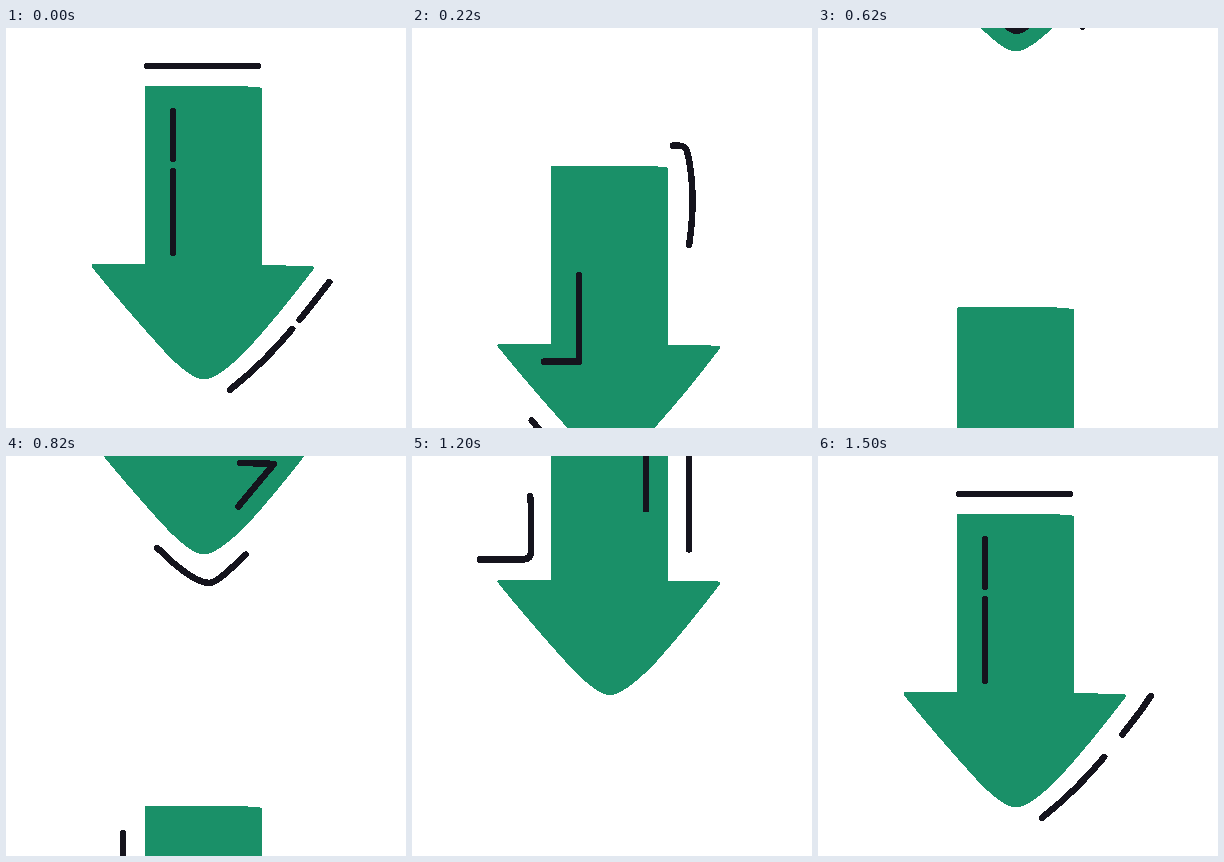
An HTML page that plays this animation: 400x400 px, repeating every 1.52 s.

```html
<!DOCTYPE html>
<html lang="en">
<head>
<meta charset="utf-8">
<title>Falling arrow</title>
<style>
  html, body { margin: 0; width: 100%; height: 100%; overflow: hidden; background: #fff; }
  svg { display: block; width: 100%; height: 100%; shape-rendering: crispEdges; }
  .body { fill: #1a9068; stroke: #1a9068; stroke-width: 4; stroke-linejoin: round; }
  .dash { fill: none; stroke: #15141d; stroke-width: 6.5; stroke-linecap: round; stroke-linejoin: round; }
</style>
</head>
<body>
<svg viewBox="0 0 400 400">
  <g id="arrow">
    <path class="body" d="M140.500 60H236L254 61.500V239L306 240Q271 286 241 319Q211 349.500 198 349.500Q185 349.500 157 319Q119 277 87.500 238L141.500 238Z"/>
  </g>
  <use id="next" href="#arrow"/>
</svg>
<script>
const LOOP = 1520;
const STEPS = 60;
const arrow = document.getElementById('arrow');
const next = document.getElementById('next');

// Tracks the dashes run along, in arrow coordinates
const ROUNDED = 'M141 38H262Q273 37 275 43Q285 85 277 138V205Q277 214 285 214H328' +
  'Q343 215 337 230Q300 292 246 346C225 365 212 380 203 380C190 380 168 362 157 350' +
  'Q135 332 110 301Q60 243 53 224Q50 217 62 216H110Q119 216 119 208V162Q114 112 119 60Q119 38 141 38Z';
const SHARP = 'M117 38H277V214H350L324 253Q306 277 287 300Q260 333 225 361' +
  'Q210 380 203 380Q190 380 157 350Q140 337 124 318L41 214H117Z';
const INNER = 'M167 83V254H130L166 304Q190 331 199 331Q208 331 232 304L268 261L234 260V83L210 81H167Z';

// head: start position of the tip; power and lag shape the easing of one lap
const dashes = [
  makeDash(ROUNDED, { head: 111, length: 111, power: 1.15 }),
  makeDash(SHARP, { head: 604, length: 87, lag: 0.135 }),
  makeDash(SHARP, { head: 505, length: 48, power: 0.9, lag: 0.1, steps: STEPS + 1 }),
  makeDash(INNER, { head: 48, length: 48, power: 1.11 }),
  makeDash(INNER, { head: 142, length: 82, power: 1.2, lag: 0.05 })
];

function makeDash(d, { head, length, power = 1, lag = 0, steps = STEPS }) {
  const path = document.createElementNS('http://www.w3.org/2000/svg', 'path');
  path.setAttribute('class', 'dash');
  path.setAttribute('d', d);
  arrow.append(path);
  const lap = path.getTotalLength();
  path.setAttribute('stroke-dasharray', `${length} ${lap - length}`);

  return step => {
    const t = step / steps;
    const progress = t ** power - lag * Math.sin(Math.PI * t) ** 2;
    path.setAttribute('stroke-dashoffset', length - head - lap * progress);
  };
}

function draw(now) {
  const t = now % LOOP;
  // Two poses every 50 ms, held for 20 and 30 ms
  const step = Math.floor(t / 50) * 2 + (t % 50 >= 20 ? 1 : 0);
  const fall = 8.85 * step;
  arrow.setAttribute('transform', `translate(0 ${fall})`);
  next.setAttribute('y', 9.375 * (step - STEPS) - fall);
  dashes.forEach(moveTo => moveTo(step));
}

function tick() {
  draw(performance.now());
  requestAnimationFrame(tick);
}
tick();
</script>
</body>
</html>
```
